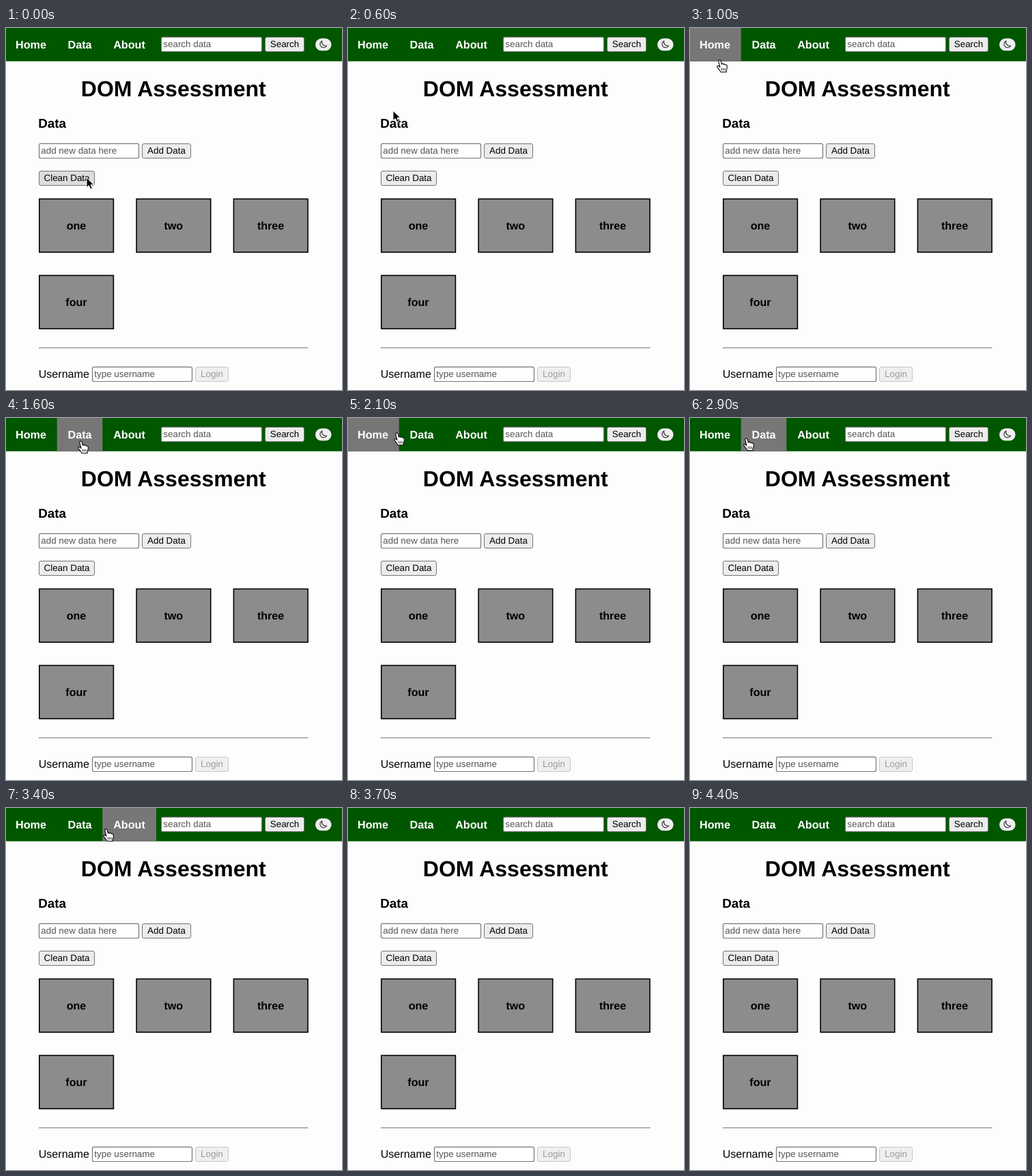
Animation of 492x530 px, one loop 4.5 s. Source, as an HTML page:

```html
<!DOCTYPE html>
<html lang="en">
<head>
<meta charset="utf-8">
<title>DOM Assessment</title>
<style>
  html, body { margin: 0; width: 100%; height: 100%; overflow: hidden; background: #fdfdfd; }
  svg { display: block; width: 492px; height: 530px; font-family: "Liberation Sans", Arial, sans-serif; text-rendering: geometricPrecision; }
  .bold { font-weight: bold; }
  .mid { text-anchor: middle; }
  .small { font-size: 13.4px; }
</style>
</head>
<body>
<svg id="stage" viewBox="0 0 492 530">
  <rect width="492" height="48.7" fill="#005700"/>
  <g id="tabs"></g>
  <g id="page"></g>
  <rect x="453" y="15.3" width="23.5" height="18" rx="9" fill="#efefef"/>
  <path d="M462.8 18.9A5.2 5.2 0 1 0 469.6 26.1A5.7 5.7 0 0 1 462.8 18.9Z" fill="none" stroke="#222" stroke-width="1.1" stroke-linejoin="round"/>
  <path id="arrow" d="M0 0V14.6L3.4 11.5L5.7 16.9L8.3 15.8L6 10.5H10.6Z" fill="#000" stroke="#fff" stroke-linejoin="round"/>
  <g id="hand" stroke="#111" stroke-width="1.2" stroke-linecap="round" stroke-linejoin="round">
    <path d="M-2.2 1.6C-2.2-.6 .8-.6 1.2 1.4L2.4 6C3 4.8 4.7 4.9 5.1 6.3C5.8 5.4 7.3 5.6 7.7 7C8.7 6.4 10.2 7.1 10.3 8.6C10.6 11 10.4 12.7 9.1 14.7V17.5H.9C.5 15.4-1.6 13.6-3.8 10.7C-5.2 8.7-3.2 7.5-1.4 9.1L-.1 10.3Z" fill="#fff"/>
    <path d="M2.4 12V15M4.7 12V15M7 12V15" stroke-width=".9"/>
  </g>
</svg>
<script>
const LOOP = 4500, STEP = 100, HIDE_AT = 3700;
const byId = id => document.getElementById(id);

function add(parent, tag, attrs, text = "") {
  const node = document.createElementNS("http://www.w3.org/2000/svg", tag);
  for (const key in attrs) node.setAttribute(key, attrs[key]);
  node.textContent = text;
  parent.append(node);
  return node;
}

const page = byId("page");
const label = (text, x, y, size, cls = "", fill = "#000", parent = page) =>
  add(parent, "text", { x, y, "font-size": size, class: cls, fill }, text);

function field(x, y, width, hint) {
  add(page, "rect", { x: x + .5, y: y + .3, width: width - 1, height: 21.2, rx: 2, fill: "#fff", stroke: "#767676", "stroke-width": 1.2 });
  add(page, "text", { x: x + 3.3, y: y + 15.2, class: "small", fill: "#555" }, hint);
}

function button(x, y, width, text, disabled = false) {
  const face = add(page, "rect", { x: x + .5, y: y + .5, width: width - 1, height: 21, rx: 2.5,
    fill: disabled ? "#efefef" : "#ececec", stroke: disabled ? "#c6c6c6" : "#747474" });
  add(page, "text", { x: x + width / 2, y: y + 15.2, class: "small mid", fill: disabled ? "#9c9c9c" : "#000" }, text);
  return face;
}

const tabs = [["Home", 0, 74.7, 36.5], ["Data", 74.7, 141.3, 108], ["About", 141.3, 220, 180.5]]
  .map(([name, left, right, center]) => {
    const face = add(byId("tabs"), "rect", { x: left, y: 0, width: right - left, height: 48.7, fill: "#777" });
    label(name, center, 29.5, 16.2, "bold mid", "#fff", byId("tabs"));
    return { face, left, right };
  });

field(227, 13, 148, "search data");
button(379, 13, 58, "Search");
label("DOM Assessment", 245.3, 100, 32, "bold mid");
label("Data", 47.3, 146.2, 18.8, "bold");
field(48, 169, 147, "add new data here");
button(199, 169, 72, "Add Data");
const cleanButton = button(48, 209, 82, "Clean Data");

["one", "two", "three", "four"].forEach((name, i) => {
  const x = 48 + i % 3 * 142.3, y = 249.5 + Math.floor(i / 3) * 112;
  add(page, "rect", { x: x + .8, y: y + .8, width: 108.6, height: 78, fill: "#8c8c8c", stroke: "#000", "stroke-width": 1.6 });
  label(name, x + 55, y + 45.5, 16.1, "bold mid");
});

add(page, "path", { d: "M48 468.3H442.5", stroke: "#999", "stroke-width": 1.5 });
label("Username", 47.7, 511.5, 16.1);
field(126, 496, 147, "type username");
button(277, 496, 49, "Login", true);

// Pointer path: time, x, y
const route = [
  [0, 118, 219], [100, 118, 217], [300, 101, 184], [600, 66, 121], [900, 45, 55],
  [1000, 44, 47], [1200, 45, 37], [1300, 56, 37], [1600, 110, 34], [1800, 163, 28],
  [1900, 147, 25], [2100, 72, 22], [2400, 30, 28], [2600, 34, 38], [2900, 83, 30],
  [3200, 180, 36], [3400, 147, 31], [3500, 129, 120], [3600, 118, 216], [HIDE_AT, 118, 216]
];

function pointerAt(time) {
  const next = Math.max(1, route.findIndex(point => point[0] >= time));
  const [t0, x0, y0] = route[next - 1], [t1, x1, y1] = route[next];
  const k = (time - t0) / (t1 - t0);
  return [x0 + (x1 - x0) * k, y0 + (y1 - y0) * k];
}

const show = (node, on) => node.setAttribute("visibility", on ? "visible" : "hidden");

function draw(now) {
  const time = Math.floor(now % LOOP / STEP) * STEP;
  const visible = time < HIDE_AT;
  const [x, y] = visible ? pointerAt(time) : [-99, 999];
  const overNav = y < 49 && x < 220;
  for (const tab of tabs) show(tab.face, overNav && x >= tab.left && x < tab.right);
  const overClean = x > 48 && x < 130 && y > 209 && y < 231;
  cleanButton.setAttribute("fill", overClean ? "#dcdcdc" : "#ececec");
  show(byId("hand"), visible && overNav);
  show(byId("arrow"), visible && !overNav);
  for (const id of ["hand", "arrow"]) byId(id).setAttribute("transform", `translate(${x} ${y})`);
}

const start = performance.now();
function tick() {
  draw(performance.now() - start);
  requestAnimationFrame(tick);
}
tick();
</script>
</body>
</html>
```
